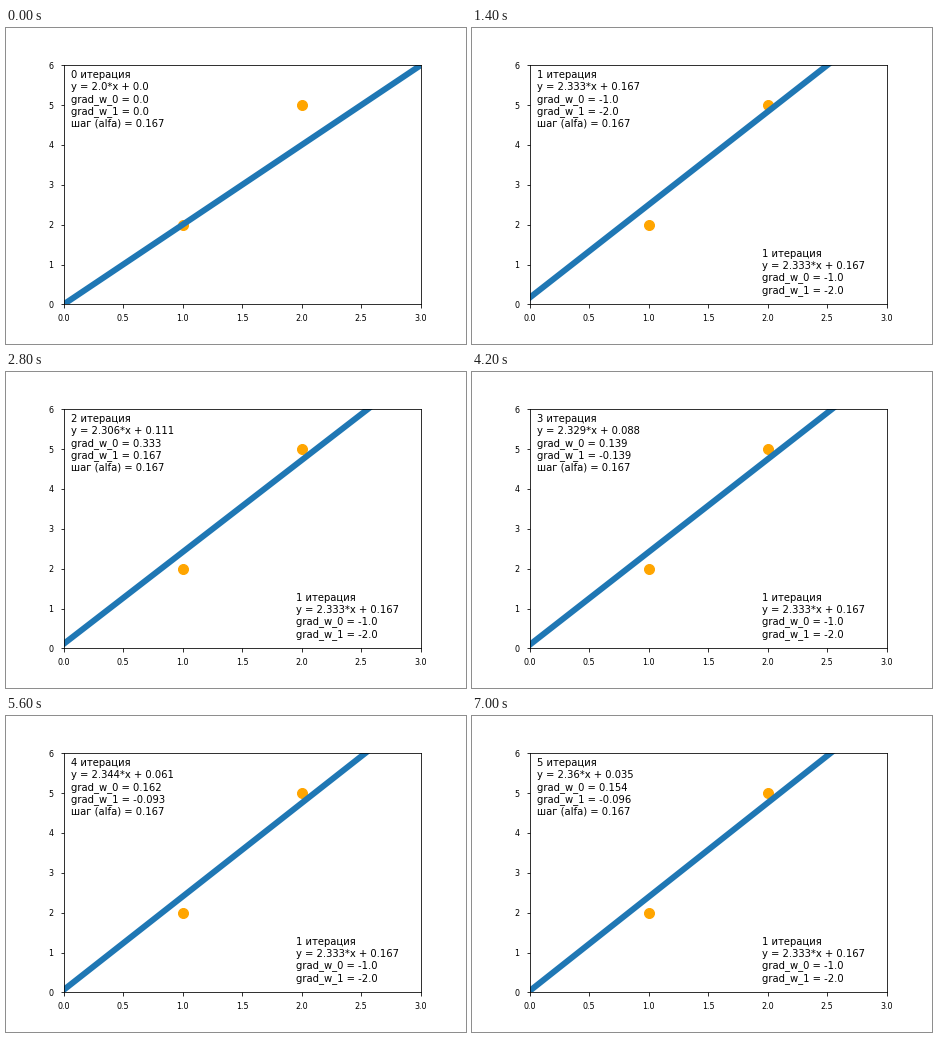
A matplotlib script for the animation above (8 s loop, 460 by 316 pixels).

```python
import matplotlib.pyplot as plt
import numpy as np
from matplotlib.animation import FuncAnimation

W, H, DPI = 460, 316, 72
LEFT, RIGHT, BOTTOM, TOP = 57.6, 414.72, 39.6, 278.78
TICK_MS, LOOP_MS, HOLD_MS = 200, 8000, 1400

X = np.array([1, 2])
Y = np.array([2, 5])
ALFA = 1 / 6


def descend(count):
    """Gradient descent on a line: slope, intercept and both gradients."""
    w1, w0, g0, g1 = 2.0, 0.0, 0.0, 0.0
    for _ in range(count):
        error = w1 * X + w0 - Y
        g0, g1 = float(error.sum()), float((error * X).sum())
        w0 -= ALFA * g0
        w1 -= ALFA * g1
    return w1, w0, g0, g1


def summary(count):
    w1, w0, g0, g1 = (round(v, 3) for v in descend(count))
    return (f"{count} итерация\ny = {w1}*x + {w0}\n"
            f"grad_w_0 = {g0}\ngrad_w_1 = {g1}")


plt.rcParams["font.family"] = "DejaVu Sans"
fig = plt.figure(figsize=(W / DPI, H / DPI), dpi=DPI, facecolor="white")
ax = fig.add_axes([LEFT / W, BOTTOM / H, (RIGHT - LEFT) / W, (TOP - BOTTOM) / H])
ax.set_xlim(0, 3)
ax.set_ylim(0, 6)
ax.set_xticks(np.arange(0, 3.5, 0.5))
ax.set_yticks(range(7))
ax.tick_params(labelsize=8, pad=6.5)

ax.scatter(X, Y, s=100, linewidths=1, color="orange")
line, = ax.plot([], [], color="#1f77b4", lw=6)
style = dict(transform=ax.transAxes, fontsize=10, va="top")
current = ax.text(0.02, 0.9783, "", **style)
first = ax.text(0.65, 0.23, "", **style)


def update(frame):
    count = frame * TICK_MS // HOLD_MS
    w1, w0 = descend(count)[:2]
    line.set_data([0, 3], [w0, w0 + 3 * w1])
    current.set_text(f"{summary(count)}\nшаг (alfa) = {ALFA:.3f}")
    first.set_text(summary(1) if count else "")
    return line, current, first


anim = FuncAnimation(fig, update, frames=LOOP_MS // TICK_MS,
                     interval=TICK_MS, repeat=True, repeat_delay=0)
plt.show()
```
